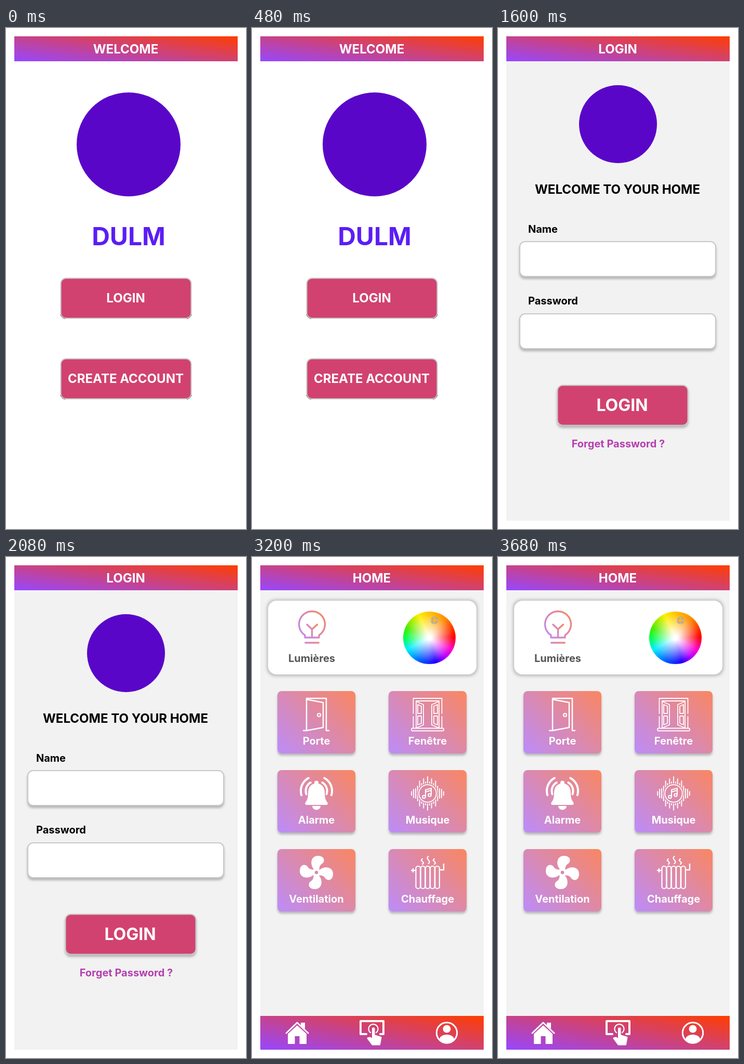
Recreate the animation shown at these times as an HTML page. Size 462 by 964 pixels, loop 4 s.

```html
<!DOCTYPE html>
<html lang="en">
<head>
<meta charset="utf-8">
<title>Smart home app</title>
<style>
  html, body { margin: 0; width: 100%; height: 100%; overflow: hidden; background: #fff; }
  svg { display: block; width: 462px; height: 964px; }
  text { font: 700 24px Inter, sans-serif; }
  .sm { font-size: 20px; }
  .lg { font-size: 32px; }
  .mid { text-anchor: middle; }
  .scene { visibility: hidden; animation: show 4s step-end infinite; }
  @keyframes show {
    0% { visibility: visible; }
    20%, 100% { visibility: hidden; }
  }
  .lift { filter: drop-shadow(0 4px 2px rgba(0, 0, 0, .25)); }
  .line { fill: none; stroke: #fff; stroke-linecap: round; stroke-linejoin: round; }
  .gray .line { stroke: #555; }
  .wheel {
    width: 101px; height: 101px; border-radius: 50%;
    background:
      radial-gradient(closest-side, #fff 8%, rgba(255, 255, 255, .55) 45%, transparent 92%),
      conic-gradient(#ffc400, #ff8a00 40deg, #f00 88deg, #f0c 118deg, #b0f 140deg,
        #20f 165deg, #06f 205deg, #0ef 242deg, #0f5 268deg, #4e0 292deg, #fe0 335deg, #ffc400);
  }
</style>
</head>
<body>
<svg id="stage" viewBox="0 0 462 964">
  <defs>
    <linearGradient id="hot" x1="0" y1="1" x2="1.098" y2=".122">
      <stop stop-color="#9747ff"/><stop offset="1" stop-color="#ff3d00"/>
    </linearGradient>
    <linearGradient id="soft" x1="0" y1="1" x2="1.098" y2=".122">
      <stop stop-color="#bc8cfa"/><stop offset="1" stop-color="#fa8661"/>
    </linearGradient>
    <filter id="blur"><feGaussianBlur stdDeviation="2"/></filter>
    <mask id="ring" maskUnits="userSpaceOnUse" x="-40" y="-40" width="80" height="80">
      <rect x="-40" y="-40" width="80" height="80" fill="#fff"/><circle r="19.5"/>
    </mask>
  </defs>
  <rect x="16" y="16" width="430" height="48" fill="url(#hot)"/>
</svg>
<script>
const INK = '#000', GRAY = '#555', WHITE = '#fff';

const times = (n, f) => Array.from({ length: n }, (_, i) => f(i)).join(' ');
const pair = (x, y) => x.toFixed(2) + ',' + y.toFixed(2);

// Point runs: an elliptic arc in degrees and a cubic curve.
const arc = (cx, cy, r, from, to, ry = r) => times(33, i => {
  const a = (from + (to - from) * i / 32) * Math.PI / 180;
  return pair(cx + r * Math.cos(a), cy + ry * Math.sin(a));
});
const curve = (...p) => times(17, i => {
  const t = i / 16, u = 1 - t;
  const at = k => u * u * u * p[k] + 3 * u * u * t * p[k + 2] + 3 * u * t * t * p[k + 4] + t * t * t * p[k + 6];
  return pair(at(0), at(1));
});

const rect = (x, y, w, h, r, attrs) =>
  `<rect x="${x}" y="${y}" width="${w}" height="${h}" rx="${r}" ${attrs}/>`;
const text = (s, x, y, cls = '', fill = INK, extra = '') =>
  `<text x="${x}" y="${y}" class="${cls}" fill="${fill}" ${extra}>${s}</text>`;
const line = (pts, w, attrs = '') =>
  `<polyline class="line" stroke-width="${w}" points="${pts}" ${attrs}/>`;
const shape = (pts, round = 0, attrs = '') =>
  `<polygon fill="#fff" stroke="#fff" stroke-linejoin="round" stroke-width="${round}" points="${pts}" ${attrs}/>`;
const dot = (x, y, r, fill = WHITE) => `<circle cx="${x}" cy="${y}" r="${r}" fill="${fill}"/>`;
const ring = (x, y, r, w) => `<circle class="line" cx="${x}" cy="${y}" r="${r}" stroke-width="${w}"/>`;
const mirror = s => s + `<g transform="scale(-1 1)">${s}</g>`;

const panel = rect(16, 64, 430, 884, 0, 'fill="#f2f2f2"');
const logo = (x, y, r) => dot(x, y, r, '#5a06c8');
const field = (label, base, y) => text(label, 58, base, 'sm') +
  rect(42, y, 377, 67, 10, 'class="lift" fill="#fff" stroke="#c8c8c8" stroke-width="2"');
const button = (x, y, cls = 'lift') =>
  rect(x, y, 251, 77, 10, `class="${cls}" fill="#d14270" stroke="#c8c8c8" stroke-width="2"`);
const flatButton = (label, y) => button(105.5, y, '') +
  '<g class="gray">' + line(arc(115.5, y + 67, 11, 165, 100), 1) + line(arc(346.5, y + 67, 11, 15, 80), 1) + '</g>' +
  text(label, 230.5, y + 46, 'mid', WHITE);
const glow = (x, y, w, h, r, a) =>
  rect(x, y, w, h, r, `fill="#000" opacity="${a}" filter="url(#blur)"`);
const rule = (y, fill) => rect(27, y, 408, 1, 0, `fill="${fill}"`);

const nav = rect(16, 883, 430, 65, 0, 'fill="url(#hot)"') +
  // house
  line('66,916 87,896 108,916', 3) + shape('94,896 102,896 102,908 94,901') +
  shape('87,902.5 104,918 104,936 92.5,936 92.5,921 81.5,921 81.5,936 70,936 70,918', 2) +
  // touch screen
  line('220,918 209,918 209,893 253,893 253,918 247,918', 4) + line(arc(233.5, 908, 9, 127, 413), 2.2) +
  shape('232.5,907 235,907 235,920.5 248,924.5 245.5,938 232,938 223,926 227,925 232.5,928', 3) +
  // profile
  ring(375, 915.5, 19.7, 3) + dot(375, 908, 7.5) +
  shape(arc(375, 928, 14, 180, 360, 9) + ' ' + arc(375, 928, 14, 0, 180, 7));

const card = (x, label, value) => glow(x - 7, 180, 204, 204, 20, .06) +
  rect(x + .5, 187.5, 189, 189, 15, 'fill="#fff" stroke="url(#hot)" stroke-width="3"') +
  text(label, x + 95, 308, 'mid', GRAY) +
  text(value, x + 95, 356, 'mid', WHITE, `stroke="${GRAY}" stroke-width="1.6"`);

const thermometer =
  line(`134,235 ${arc(125, 214, 9, 360, 180)} ${arc(125, 252, 13, 227, -35)}`, 4) +
  times(3, i => line(`134,${214.5 + 8 * i} 142,${214.5 + 8 * i}`, 4)) +
  line('125,214 125,250', 4) + dot(125, 252, 5, GRAY);
const drop =
  line(`${curve(335, 205, 330, 214, 313, 228, 313, 243)} ${arc(335, 243, 22, 180, 0)}
    ${curve(357, 243, 357, 228, 340, 214, 335, 205)}`, 4) +
  line('325,253 345,233', 4) + ring(328.5, 232.5, 4, 4) + ring(341, 253, 4, 4);
const bulb =
  line(`102,155 ${arc(115.5, 129.5, 25, 123, 417)} 129,155 102,155`, 3.4, 'style="stroke:url(#soft)"') +
  line('106,130 115.5,139 115.5,155 115.5,139 125.5,130', 3.4, 'style="stroke:url(#soft)"') +
  rect(101, 163.3, 29, 3.4, 1.7, 'fill="url(#soft)"');

// Tile icons are drawn around their own centre.
const icons = {
  Porte: line('-25,31 -19,31 -19,-31 19,-31 19,31 24,31', 2.5) +
    line('-19,-29 13,-23 13,25 -19,31', 2.5) + ring(5, 1, 3, 2.2),
  'Fenêtre': mirror([
      '0,-31 -27.5,-31 -27.5,-2', '-27.5,4 -27.5,26', '0,-26 -22,-26 -22,26', '-22,-25 -8,-19 -8,20 -22,26',
      '-19,-19 -12,-16 -12,-2 -19,-2 -19,-19', '-19,3 -12,3 -12,17 -19,20 -19,3'
    ].map(p => line(p, 1.8)).join('')) +
    rect(-31, 26.5, 62, 5, 2, 'class="line" stroke-width="1.8"'),
  Alarme: mirror(line(arc(-2, -5, 28, 163, 242), 4) + line(arc(-2, -5, 18.5, 160, 240), 4) +
      shape(`.5,-20 ${curve(-4, -19, -12, -17, -16, -10, -16, -1)}
        ${curve(-16, -1, -16, 9, -18, 13, -21, 17)} -22,20 -20,22 .5,22`)) +
    dot(0, -20.5, 4) + shape(arc(0, 24, 8, 0, 180, 7.5)),
  Musique: '<g mask="url(#ring)">' + times(17, i => {
      const h = [32, 22, 28, 19, 24, 14, 9, 8, 3.5][Math.abs(i - 8)], x = (i - 8) * 3.85;
      return line(`${x},${-h} ${x},${h}`, 1.9);
    }) + '</g>' + ring(0, 0, 16.8, 1.8) +
    line('-4,6 -4,-7 7,-10 7,2', 2) + line('-4,-3 7,-6', 2) + ring(-7, 6.5, 2.8, 2) + ring(4, 3, 2.8, 2),
  Ventilation: times(4, i => shape(`${curve(-4, -5, -13, -14, -12, -32, 3, -32)}
      ${curve(3, -32, 16, -32, 17, -21, 11, -17)} ${curve(11, -17, 5, -13, 6, -9, 5, -4)}`,
      0, `transform="rotate(${i * 90})"`)) +
    dot(0, 0, 8) + dot(0, 0, 3.3, '#d58aae'),
  Chauffage: times(5, i => rect(-22.5 + 9.2 * i, -12, 8.6, 43, 4, 'class="line" stroke-width="2.2"')) +
    times(3, i => {
      const x = 11.5 * i - 10, mid = i == 1, y = mid ? -31 : -26, h = mid ? 14 : 10;
      return line(curve(x, y, x - 7, y + h * .4, x + 7, y + h * .6, x, y + h), 2.2);
    }) +
    line('-31,-4 -23,-4', 2.4) + line('-28,-7 -28,-1', 2.4) + line('23,-5 31,-5 31,-16', 2.4)
};
const tile = (label, i) => {
  const x = 49 + i % 2 * 214, y = 258 + (i >> 1) * 152;
  return rect(x, y, 150, 120, 8, 'class="lift" fill="url(#soft)"') +
    `<g transform="translate(${x + 75} ${y + 45})">${icons[label]}</g>` +
    text(label, x + 75, y + 103, 'sm mid', WHITE);
};

const scenes = [
  ['WELCOME', logo(236, 224, 100) +
    text('DULM', 236, 418, 'mid', '#5b1df5', 'style="font-size:48px"') +
    flatButton('LOGIN', 481.5) + flatButton('CREATE ACCOUNT', 636.5)],

  ['SIGNING', panel + text('WELCOME', 220, 121, 'mid') +
    field('Surname', 175, 192) + field('Name', 312, 329) + field('E-mail', 449, 469) +
    field('Password', 589, 607) + field('Confirm-Password', 727, 743) +
    button(106.5, 842.5) + text('CREATE', 231.5, 892, 'lg mid', WHITE)],

  ['LOGIN', panel + logo(231, 185, 75) + text('WELCOME TO YOUR HOME', 230, 319, 'mid') +
    field('Name', 394, 411) + field('Password', 532, 550) +
    button(114.5, 687.5) + text('LOGIN', 239, 737, 'lg mid', WHITE) +
    text('Forget Password ?', 231.5, 807, 'sm mid', '#b53fb0')],

  ['DATA', panel + text('Intérieur', 28, 115, 'sm', GRAY) + rule(121, '#d3d3d3') +
    card(32, 'Température', '10°c') + card(240, 'Humidité', '20%') +
    `<g class="gray">${thermometer}${drop}</g>` +
    text('Extérieur', 28, 461, 'sm', GRAY) + rule(467, INK) + nav],

  ['HOME', panel + glow(26, 79, 411, 153, 19, .07) + glow(30, 83, 403, 145, 16, .16) +
    rect(31, 84, 401, 142, 16, 'fill="#fff"') + bulb + text('Lumières', 115, 202, 'sm mid', GRAY) +
    '<foreignObject x="291" y="105" width="101" height="101"><div class="wheel"></div></foreignObject>' +
    '<circle cx="351" cy="122" r="5.5" fill="#f5b53c" stroke="#777" stroke-width="2.4"/>' + ring(351, 122, 5.5, 1) +
    Object.keys(icons).map(tile).join('') + nav]
];

document.getElementById('stage').innerHTML += scenes.map(([title, body], i) =>
  `<g class="scene" style="animation-delay:${i * 800 - 4000}ms">${text(title, 230.5, 48.5, 'mid', WHITE)}${body}</g>`
).join('');
</script>
</body>
</html>
```
